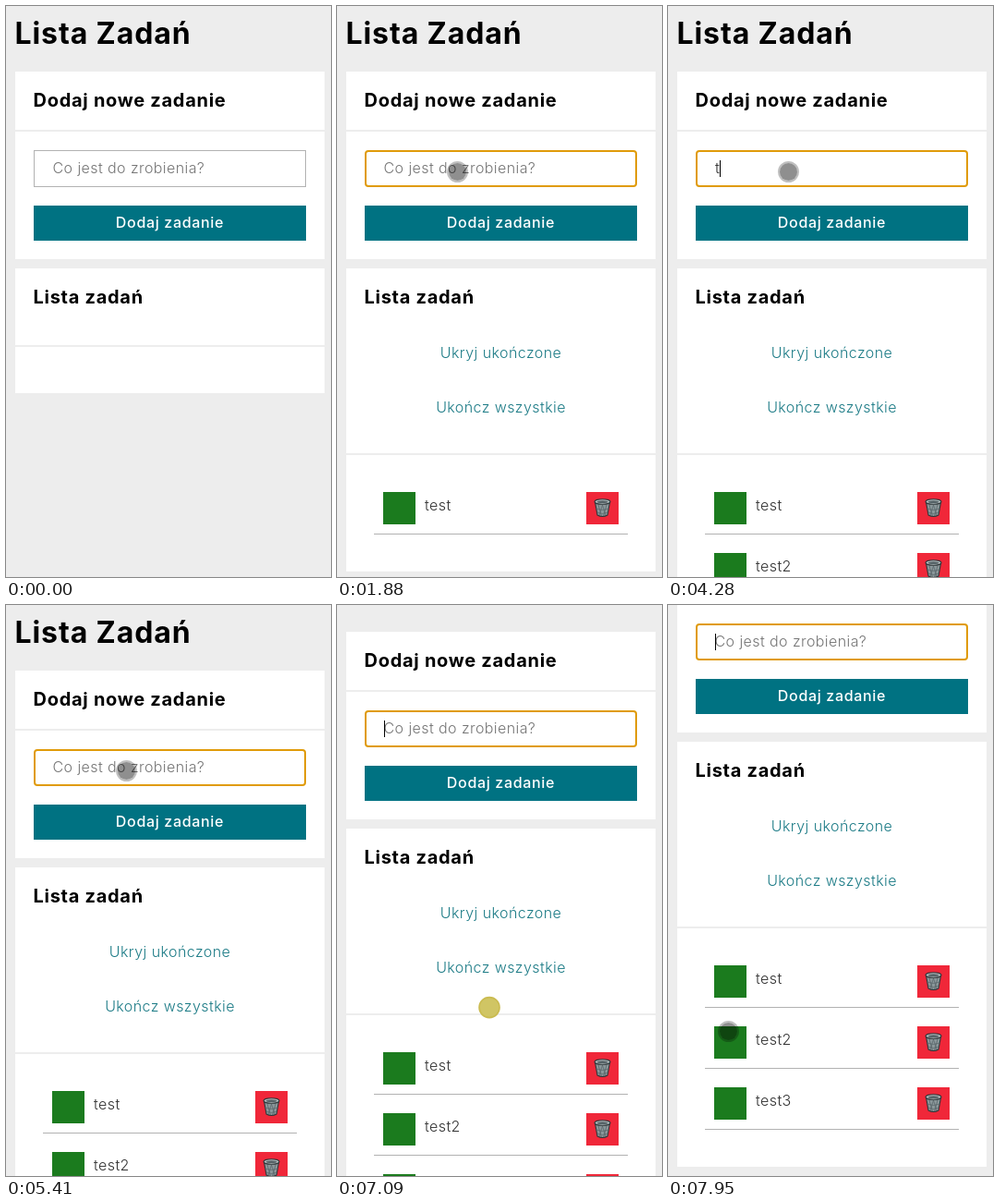
Write an HTML page that moves like this. It is 352 by 618 pixels and loops after 8000 ms.

```html
<!DOCTYPE html>
<html lang="pl">
<head>
<meta charset="utf-8">
<title>Lista Zadań</title>
<style>
  html, body { margin: 0; width: 100%; height: 100%; overflow: hidden; background: #ededed; }
  svg { display: block; width: 100%; height: 100%; }
  text { font: 350 16px Inter, "Open Sans", sans-serif; font-optical-sizing: none; letter-spacing: .026em; fill: #333; }
  .h1 { font-size: 32px; font-weight: 700; letter-spacing: .028em; fill: #000; }
  .h2 { font-size: 20px; font-weight: 700; letter-spacing: .036em; fill: #000; }
  .button { font-weight: 450; letter-spacing: .042em; fill: #fff; }
  .link { fill: #1c7b86; }
  .mid { text-anchor: middle; }
  .card { fill: #fff; }
  .rule { fill: #ededed; }
</style>
</head>
<body>
<svg viewBox="0 0 352 618">
  <defs>
    <g id="bin" stroke="#2c3437" stroke-linejoin="round">
      <path d="M-8-6 L-5.5 8 Q0 11 5.5 8 L8-6Z" fill="#8a979a" stroke-width="1.1"/>
      <path d="M-4.5-3 L-1 9 M0-3 L3.5 8.5 M4.5-3 L1 9 M0-3 L-3.5 8.5 M-7 1 Q0 4 7 1 M-6 5 Q0 8 6 5" fill="none" stroke="#566468" stroke-width=".7"/>
      <ellipse cy="-6.5" rx="8.5" ry="2.8" fill="#b4bec0" stroke-width="1.1"/>
      <ellipse cy="-6.3" rx="6" ry="1.4" fill="#566468" stroke="none"/>
    </g>
  </defs>
  <g id="page">
    <text class="h1" x="9.5" y="41">Lista Zadań</text>

    <rect class="card" x="10" y="71" width="335" height="203"/>
    <text class="h2" x="29.5" y="109">Dodaj nowe zadanie</text>
    <rect class="rule" x="10" y="134" width="335" height="2"/>
    <rect id="blurred" x="30.5" y="156.5" width="294" height="39" fill="#fff" stroke="#b2b2b2"/>
    <rect id="focused" x="31" y="157" width="293" height="38" rx="3" fill="#fff" stroke="#e09b0a" stroke-width="2"/>
    <text id="hint" x="50.5" y="181" style="fill:#757575">Co jest do zrobienia?</text>
    <text id="draft" x="51" y="181"></text>
    <rect id="caret" y="167" width="1" height="18"/>
    <rect x="30" y="216" width="295" height="38" fill="#007282"/>
    <text class="button mid" x="177.5" y="240">Dodaj zadanie</text>

    <rect id="listCard" class="card" x="10" y="284" width="335"/>
    <text class="h2" x="29.5" y="322">Lista zadań</text>
    <rect id="listRule" class="rule" x="10" width="335" height="2"/>
    <g id="links">
      <text class="link mid" x="177.5" y="381">Ukryj ukończone</text>
      <text class="link mid" x="177.5" y="440">Ukończ wszystkie</text>
    </g>
    <g id="items"></g>
  </g>
  <g id="pointer">
    <g id="idle">
      <circle r="10.5" fill="none" stroke="#000" stroke-opacity=".25" stroke-width="2"/>
      <circle r="9.5" fill-opacity=".44"/>
    </g>
    <circle id="pressed" r="11" fill="#d0c564" stroke="#cabb50" stroke-width="1.6"/>
  </g>
</svg>
<script>
const LOOP = 8000, STEP = 1000 / 15;
const $ = id => document.getElementById(id);
const show = (id, on) => $(id).setAttribute('display', on ? 'inline' : 'none');
const set = (id, name, value) => $(id).setAttribute(name, value);

const tasks = [
  { name: 'test', keys: [1020, 1080, 1280, 1410], added: 1880 },
  { name: 'test2', keys: [2950, 3010, 3210, 3280, 3540], added: 3740 },
  { name: 'test3', keys: [4280, 4350, 4550, 4680, 4880], added: 5210 }
];
const focusAt = 750, dragStart = 6690, dragEnd = 7680, maxScroll = 136;
const caretToggles = [750, 1880, 2420, 2880, 2950, 4080, 4280, 5410, 5880, 6400, 6880, 7350, 7880];

// time, x, y, and whether the move leading there is eased
const path = [
  [84, 338, 600], [640, 130.5, 179.5, true], [5900, 130.5, 179.5],
  [6480, 173, 525, true], [6617, 174.5, 491], [6860, 174.5, 491],
  [7084, 165, 435.5], [7350, 161, 369.5], [7684, 153, 310], [7950, 65.5, 461.5]
];

$('items').innerHTML = tasks.map(({ name }, i) => `
  <g id="item${i}" transform="translate(0 ${i * 66})">
    <rect x="50" y="526" width="35" height="35" fill="#1b7b1e"/>
    <text x="95" y="546">${name}</text>
    <rect x="270" y="526" width="35" height="35" fill="#f02739"/>
    <use href="#bin" x="287.5" y="543"/>
    <rect x="40" y="571" width="275" height="1" fill="#b2b2b2"/>
  </g>`).join('');

function pointerAt(t) {
  const next = path.findIndex(p => p[0] > t);
  if (next === 0) return path[0].slice(1, 3);
  if (next < 0) return path[path.length - 1].slice(1, 3);
  const [t0, x0, y0] = path[next - 1], [t1, x1, y1, eased] = path[next];
  let k = (t - t0) / (t1 - t0);
  if (eased) k = k * k * (3 - 2 * k);
  return [x0 + (x1 - x0) * k, y0 + (y1 - y0) * k];
}

function scrollAt(t, y) {
  if (t < dragStart) return 0;
  if (t >= dragEnd) return maxScroll;
  return Math.round(Math.max(0, Math.min(maxScroll, 477.5 - y)));
}

function draw(t) {
  const passed = times => times.filter(time => time <= t).length;
  const count = passed(tasks.map(task => task.added));
  const current = tasks[count];
  const typed = current ? current.name.slice(0, passed(current.keys)) : '';

  show('blurred', t < focusAt);
  show('focused', t >= focusAt);
  show('hint', !typed);
  $('draft').textContent = typed;
  set('caret', 'x', typed ? Math.round(51 + $('draft').getComputedTextLength()) : 51);
  show('caret', passed(caretToggles) % 2);

  show('links', count);
  set('listRule', 'y', count ? 484 : 367);
  set('listCard', 'height', count ? 262 + count * 66 : 135);
  tasks.forEach((_, i) => show('item' + i, i < count));

  // The pointer is sampled fifteen times a second
  const sampled = Math.floor(t / STEP) * STEP + 17;
  const [x, y] = pointerAt(sampled);
  const pressed = (t >= 680 && t < focusAt) || (t >= dragStart && t < dragEnd);
  show('pointer', t >= 70);
  show('idle', !pressed);
  show('pressed', pressed);
  set('pointer', 'transform', `translate(${x} ${y})`);
  set('page', 'transform', `translate(0 ${-scrollAt(t, y)})`);
}

const start = performance.now();
function tick() {
  draw((performance.now() - start) % LOOP);
  requestAnimationFrame(tick);
}
tick();
</script>
</body>
</html>
```
